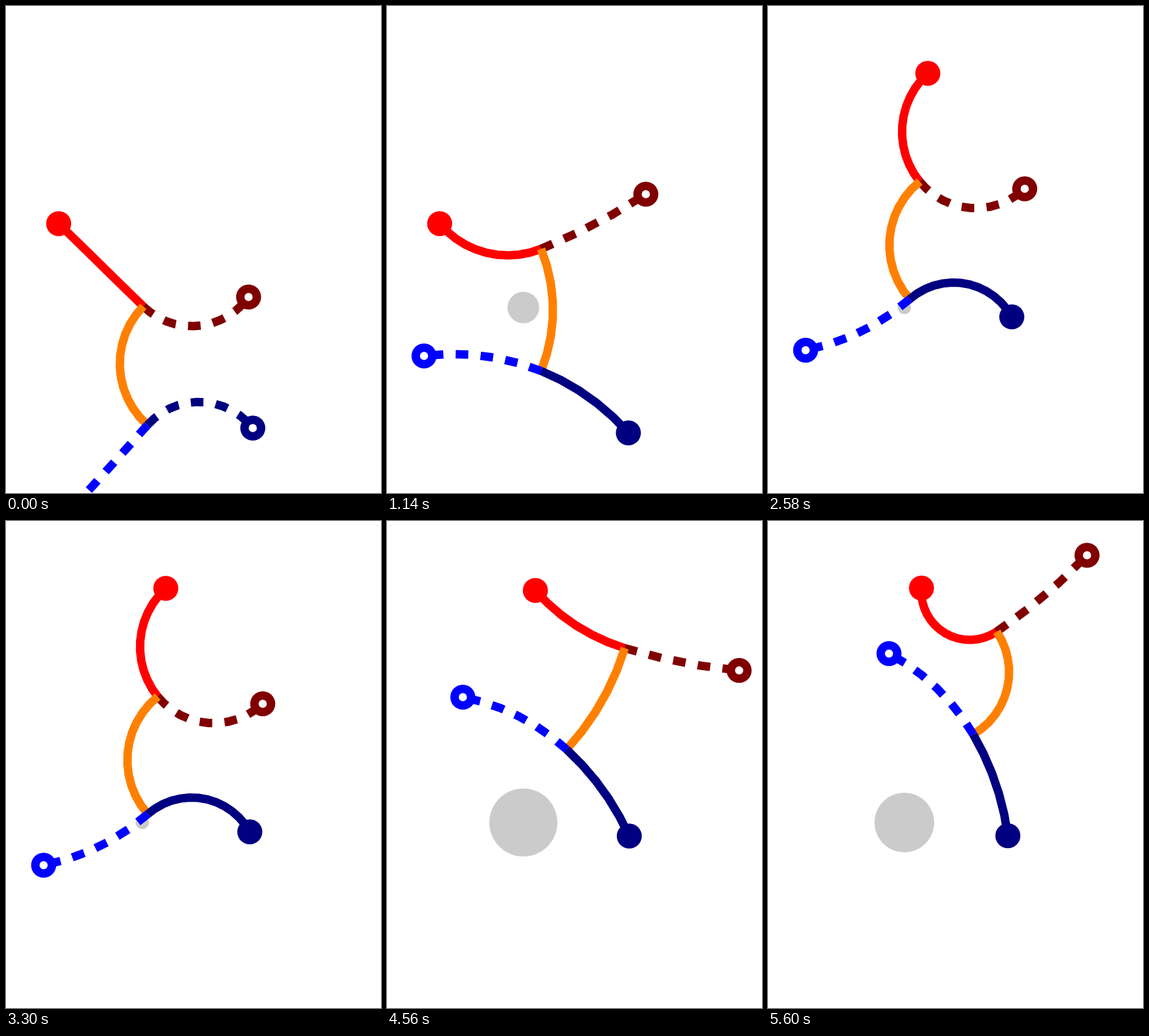
These frames come from a looping animation (623 px wide and 810 px high, 5620 ms). An HTML page with a canvas:

```html
<!DOCTYPE html>
<html lang="en">
<head>
<meta charset="utf-8">
<title>Soft crawler</title>
<style>
html, body { margin: 0; width: 100%; height: 100%; overflow: hidden; background: #fff; }
canvas { display: block; }
</style>
</head>
<body>
<canvas id="stage" width="623" height="810"></canvas>
<script>
const ctx = document.getElementById('stage').getContext('2d');
const LOOP = 5620, STEP = 20, RAD = Math.PI / 180;
const RED = '#f00', MAROON = '#800000', ORANGE = '#ff8000', BLUE = '#00f', NAVY = '#000080';

const wrap = a => Math.atan2(Math.sin(a), Math.cos(a));

// Arc from a to b that leaves a in direction dir: [bend, length]
function fit(a, b, dir) {
  const dx = b[0] - a[0], dy = b[1] - a[1];
  const half = wrap(Math.atan2(dy, dx) - dir);
  const chord = Math.hypot(dx, dy);
  return [2 * half, Math.abs(half) < 1e-4 ? chord : chord * half / Math.sin(half)];
}

// A pose is given by the front angle, disc radius, four feet and two joints.
// It becomes angles and lengths, so limbs swing instead of shrinking.
function pose(deg, disc, fl, fr, front, rear, rl, rr) {
  const th = deg * RAD;
  const torso = fit(front, rear, th + Math.PI / 2);
  const ph = th + torso[0];
  return [disc, ...fl, ...fr, th,
    ...fit(front, fl, th + Math.PI), ...fit(front, fr, th), ...torso,
    ...fit(rear, rl, ph + Math.PI), ...fit(rear, rr, ph)];
}

const start  = pose(44.4, 0, [87.5, 362], [403, 484], [228, 499.5], [235, 697], [102, 844], [410, 702]);
const reach  = pose(-33, 20, [87.5, 362], [427, 264], [261, 392], [266, 592], [62, 606], [405, 707]);
const right  = pose(-22, 26.3, [87.5, 362], [430, 313], [256, 404], [256, 607], [61.5, 582], [401, 710]);
const swing  = pose(15, 20, [173, 186], [428, 308], [262, 340], [275, 548], [60, 570], [450, 640]);
const left   = pose(63.4, 12.5, [330.5, 103], [426, 303], [274, 281], [231.5, 474], [54.5, 551], [401.5, 503]);
const rest   = pose(51, 11, [265.5, 112], [426.5, 304], [252, 292], [235.5, 487.5], [62.5, 572.5], [405, 517]);
const mid    = pose(10, 49.7, [256, 111.5], [502, 143.5], [366, 254], [349.5, 472], [162.5, 419.5], [451.5, 608]);
const spread = pose(17, 56.5, [246.5, 115.5], [585, 248.5], [395, 211.5], [298.5, 380], [126, 293], [402.5, 524]);
const lift   = pose(-43, 51, [254, 111.5], [512, 24], [378, 178], [350, 350], [205, 213], [400, 524]);
const finish = pose(-34, 49.5, [255, 111.5], [530, 57], [380, 184], [341, 355], [201, 220.5], [398.5, 523.5]);

const track = [[0, start], [340, reach], [600, right], [1140, right], [1700, swing], [2020, left],
  [2580, rest], [3480, rest], [4040, mid], [4560, spread], [4980, lift], [5260, finish], [5600, finish]];

const slope = (i, k) => (track[i + 1][1][k] - track[i][1][k]) / (track[i + 1][0] - track[i][0]);

// Monotone tangent at key i
function tangent(i, k) {
  if (i === 0) return slope(0, k);
  if (i === track.length - 1) return 0;
  const a = slope(i - 1, k), b = slope(i, k);
  return a * b <= 0 ? 0 : 2 * a * b / (a + b);
}

function sample(t) {
  let i = 0;
  while (i < track.length - 2 && t >= track[i + 1][0]) i++;
  const [t0, p] = track[i], [t1, q] = track[i + 1];
  const h = t1 - t0, u = Math.min(1, (t - t0) / h), v = 1 - u;
  return p.map((a, k) => a * v * v * (1 + 2 * u) + q[k] * u * u * (3 - 2 * u)
    + h * u * v * (v * tangent(i, k) - u * tangent(i + 1, k)));
}

function arc(from, dir, bend, len) {
  const n = Math.max(3, Math.round(2 + Math.abs(bend) / RAD / 9));
  const pts = [];
  for (let i = 0; i <= n; i++) {
    const s = i / n, half = bend * s / 2;
    const chord = len * s * (Math.abs(half) < 1e-4 ? 1 : Math.sin(half) / half);
    pts.push([from[0] + chord * Math.cos(dir + half), from[1] + chord * Math.sin(dir + half)]);
  }
  return pts;
}

const last = pts => pts[pts.length - 1];

function line(pts, color, solid) {
  ctx.strokeStyle = color;
  ctx.lineWidth = 14;
  ctx.setLineDash(solid ? [] : [21, 20.5]);
  ctx.beginPath();
  pts.forEach(p => ctx.lineTo(p[0], p[1]));
  ctx.stroke();
}

function disc(p, r, color) {
  ctx.fillStyle = color;
  ctx.beginPath();
  ctx.arc(p[0], p[1], r, 0, 2 * Math.PI);
  ctx.fill();
}

function foot(p, color, solid) {
  disc(p, 20.8, color);
  if (!solid) disc(p, 6.8, '#fff');
}

function draw(t) {
  const [r, lx, ly, rx, ry, th, b1, l1, b2, l2, b3, l3, b4, l4, b5, l5] = sample(t);
  const diagonal = t < 1160 || t >= 1900;
  const held = [diagonal, !diagonal, !diagonal, diagonal && t >= STEP];

  // Place the front joint from whichever front foot carries the body
  const byRight = t >= 1140 && t < 2020;
  const reachEnd = byRight ? last(arc([0, 0], th, b2, l2)) : last(arc([0, 0], th + Math.PI, b1, l1));
  const front = byRight ? [rx - reachEnd[0], ry - reachEnd[1]] : [lx - reachEnd[0], ly - reachEnd[1]];

  const torso = arc(front, th + Math.PI / 2, b3, l3);
  const rear = last(torso), ph = th + b3;
  const legs = [
    [arc(front, th + Math.PI, b1, l1), RED],
    [arc(front, th, b2, l2), MAROON],
    [arc(rear, ph + Math.PI, b4, l4), BLUE],
    [arc(rear, ph, b5, l5), NAVY]
  ];
  const leg = i => line(legs[i][0], legs[i][1], held[i]);

  ctx.fillStyle = '#fff';
  ctx.fillRect(0, 0, 623, 810);
  if (r > 0) disc([226.5, 501.5], r, '#cbcbcb');
  leg(0);
  leg(1);
  line(torso, ORANGE, true);
  leg(3);
  leg(2);
  legs.forEach(([pts, color], i) => foot(last(pts), color, held[i]));
}

const begin = performance.now();
function tick(now) {
  const t = Math.max(0, now - begin) % LOOP;
  draw(Math.floor(t / STEP) * STEP);
  requestAnimationFrame(tick);
}
draw(0);
requestAnimationFrame(tick);
</script>
</body>
</html>
```
